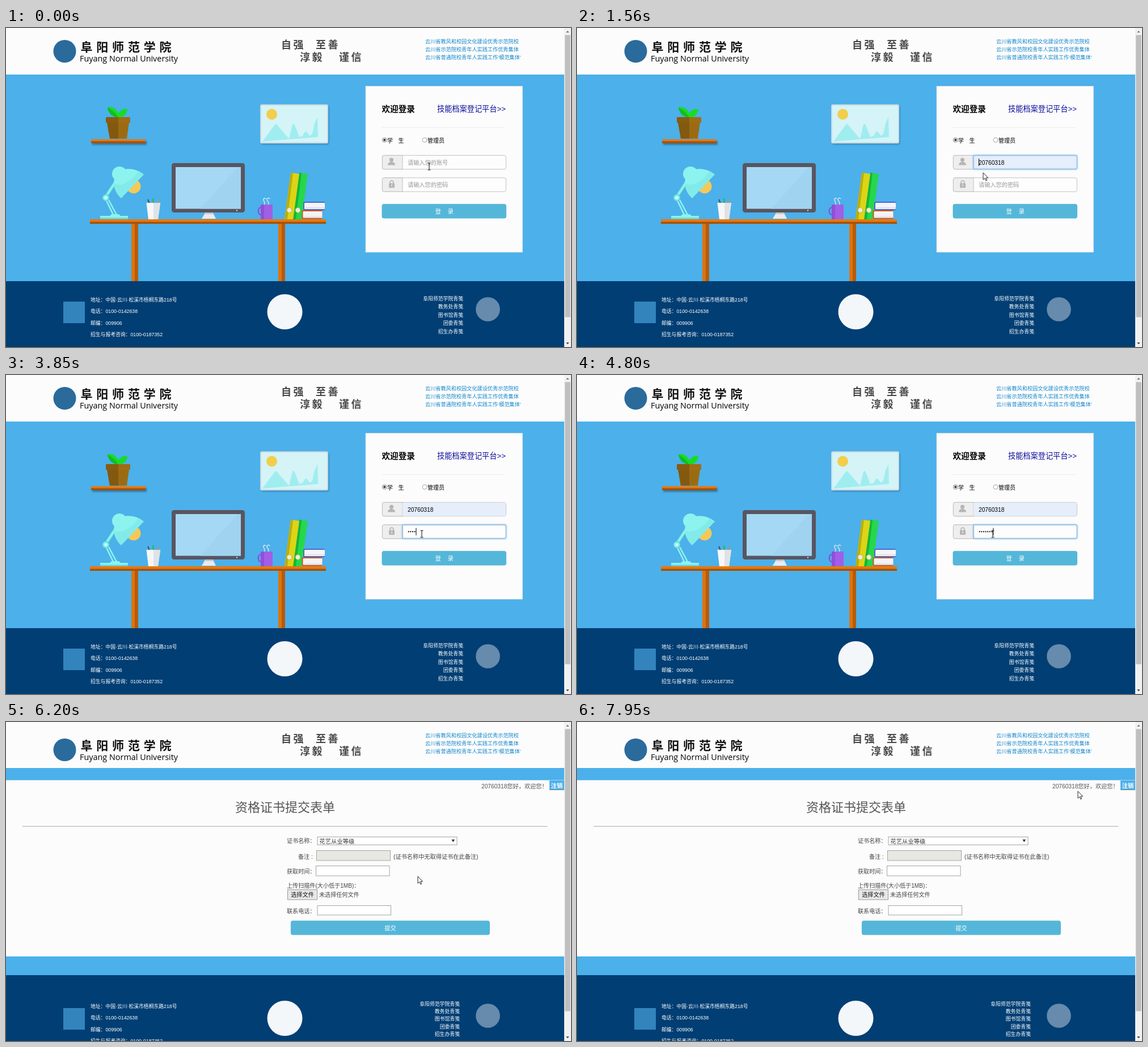
Write an HTML page that moves like this. It is 996 px wide and 562 px high and loops after 8000 ms.

```html
<!DOCTYPE html>
<html lang="zh-CN">
<head>
<meta charset="utf-8">
<title>登录</title>
<style>
html, body { margin: 0; width: 100%; height: 100%; overflow: hidden; background: #fcfcfc; }
svg { display: block; width: 100vw; height: 100vh; }
text { font-family: "Liberation Sans", "Noto Sans CJK SC", "Noto Sans CJK", sans-serif; white-space: pre; }
</style>
</head>
<body>
<svg id="stage" viewBox="0 0 996 562"></svg>
<script>
const LOOP = 8000;
const ACCOUNT = "20760318";
const SKY = "#4cb0ea", NAVY = "#003e74", PAPER = "#fcfcfc";

// cy is the visual middle of the line
const text = (x, cy, size, str, fill = "#000", more = "") =>
  `<text x="${x}" y="${cy + size * 0.37}" font-size="${size}" fill="${fill}" ${more}>${str}</text>`;
const rect = (x, y, w, h, fill, more = "") =>
  `<rect x="${x}" y="${y}" width="${w}" height="${h}" fill="${fill}" ${more}/>`;
const circle = (x, y, r, fill, more = "") =>
  `<circle cx="${x}" cy="${y}" r="${r}" fill="${fill}" ${more}/>`;
const path = (d, fill, more = "") => `<path d="${d}" fill="${fill}" ${more}/>`;
const line = (d, stroke, width, more = "") =>
  path(d, "none", `stroke="${stroke}" stroke-width="${width}" ${more}`);

const END = 'text-anchor="end"', MID = 'text-anchor="middle"', BOLD = 'font-weight="700"';

function header(dy) {
  const motto = (x, cy, s) =>
    text(x, cy, 18, s, "#484848", 'font-weight="700" letter-spacing="3.6"');
  const awards = ["云川省教风和校园文化建设优秀示范院校", "云川省示范院校青年人实践工作优秀集体",
    "云川省普通院校青年人实践工作‘模范集体’"];
  return circle(103.5, 41 + dy, 20, "#2a6b9c") +
    text(131.5, 33 + dy, 21, "阜阳师范学院", "#111", 'font-weight="700" letter-spacing="6.8"') +
    `<text x="130" y="${59 + dy}" font-size="14.4" style="font-family:'Open Sans',sans-serif">Fuyang Normal University</text>` +
    motto(485, 29, "自强") + motto(546, 29, "至善") +
    motto(518, 51.5, "淳毅") + motto(587, 51.5, "谨信") +
    awards.map((s, i) => text(739, 24 + i * 13.6, 9.17, s, "#1488cc", 'font-weight="500"')).join("");
}

function footer(dy, right, top, step, iconY) {
  const contact = ["地址：中国·云川·松溪市梧桐东路218号", "电话：0100-0142638",
    "邮编：009906", "招生与报考咨询：0100-0187352"];
  const links = ["阜阳师范学院", "教务处", "图书馆", "团委", "招生办"];
  return rect(0, 446, 984, 116, NAVY) +
    rect(101, 482 + dy, 38, 38, "#3384bd") +
    contact.map((s, i) => text(149, 478.3 + dy + i * 20.5, 8.8, s, "#fff")).join("") +
    circle(491.5, 500 + dy, 31, "#f4f7f9") +
    links.map((s, i) => text(right, top + i * step, 8.85, s + "青笺", "#fff", END)).join("") +
    circle(849.5, iconY, 21.3, "#668bad");
}

function desk() {
  const leg = x => rect(x, 345, 6, 101, "#dd730e") + rect(x + 6, 345, 6, 101, "#b65b0b");
  return rect(148, 337, 416, 5, "#e8780f") + rect(148, 341.5, 416, 3.5, "#a4520c") + leg(221) + leg(480);
}

function shelf() {
  return rect(152, 199, 96, 7, "#22566f", 'filter="url(#soft)" opacity=".6"') +
    rect(150, 196, 96, 4, "#e8780f") + rect(150, 199.5, 96, 3.5, "#a4520c") +
    path("M197 158C188 157 180 149 179 140C188 137 195 143 198 150C202 145 207 141 214 143C214 152 206 158 197 158Z", "#17dc27") +
    path("M197 158C194 149 187 145 179 140C180 149 186 156 197 158Z", "#10bd22") +
    path("M178 166H217L213 195H183Z", "#9b6b14") + path("M178 166H198V195H183Z", "#83590f") +
    rect(176, 157, 43, 10, "#a06c14", 'rx="1.5"') + rect(176, 157, 22, 10, "#875c10", 'rx="1.5"');
}

function picture() {
  return rect(450, 137, 119, 68, "#1e5f85", 'rx="3" filter="url(#soft)" opacity=".6"') +
    rect(449, 135.5, 118, 67, "#d4f4f7", 'rx="2" stroke="#cbd9e0" stroke-width="2"') +
    circle(468.5, 152, 9.5, "#f3ce4b") +
    path("M452 200L474 170Q476 168 478 171L491 186L499 195L505 170Q507 167 509 171L517 192L523 190L527 183Q529 181 531 184L536 190L540 186L544 168L549 157L550 192Z", "#a0edf0");
}

function lamp() {
  const c = "#8df3ef", d = "#5fd2d8";
  return circle(225, 279, 12.5, "#f5c957") +
    line("M175 300L190 331M181 303L196 331", c, 2.6) +
    line("M176 297L196 267", d, 6) + line("M176 297L195 268", c, 3.4) +
    circle(176, 299, 5.5, c, `stroke="${d}" stroke-width="1.5"`) + circle(176, 299, 2, "#fff") +
    circle(200, 257, 13, c) +
    path("M203 300C188 287 187 266 196 256C208 244 230 247 243 258Z", c) +
    path("M203 300C195 293 191 284 191 274C205 281 226 266 233 252L243 258Z", d, 'opacity=".25"') +
    path("M183 332Q184 328 188 328H197Q201 328 202 332Z", c) +
    rect(166, 331, 49, 5.5, c) + rect(166, 334.5, 49, 2, d);
}

function monitor() {
  return path("M352 324H364L370 336H345Z", "#e9ebf1") + path("M352 324H364L366 328H351Z", "#c4c8d1") +
    rect(292, 238, 129, 87, "#595560", 'rx="4.5"') +
    rect(299, 245, 115, 73.5, "#a5d8f4") + path("M409 245H414V318.5H342Z", "#9fd3f0") +
    circle(407, 321.5, 1.1, "#fff");
}

function cups() {
  return line("M253 309L250 302", "#3d5368", 2) + line("M259.5 309V300", "#20b84b", 2) +
    line("M266 309L270 304", "#e58a30", 2) +
    path("M247.5 308H272L268 337H251Z", "#f7f7f7") + path("M260 308H272L268 337H260Z", "#dfe3e6") +
    line("M450 316C443 316 443 329 450 329", "#8c4fd8", 2.4) +
    rect(449, 311, 21, 26, "#a05fe6", 'rx="1.5"') + rect(449, 311, 6, 26, "#8f50d9", 'rx="1.5"') +
    line("M455 311C459 308 452 304 454 301Q456 299 458 301M462 311C466 307 458 304 460 301Q463 298 465 301", "#d8e8f2", 1.4);
}

function books() {
  const tilted = (x, main, dark) =>
    path(`M${x + 11} 255L${x + 26} 257L${x + 15} 337H${x}Z`, main) +
    path(`M${x + 11} 255L${x + 15} 255.5L${x + 5} 337H${x}Z`, dark) +
    circle(x + 8.5, 321, 4.4, "#f1eecb", 'stroke="#a7a77a" stroke-width=".8"');
  const flat = (x, y, w, h, color) =>
    rect(x, y, w, h, color, 'rx="2"') + rect(x + 2, y + 2, w - 2, h - 4, "#f4f4f8", 'rx="1"') +
    line(`M${x + 4} ${y + h - 4.5}H${x + w}`, "#d6d8e0", 1);
  return tilted(506, "#25d84b", "#15b636") + tilted(491, "#ded416", "#b9ae0e") +
    flat(524, 306, 38, 15, "#4b69cf") + flat(521.5, 321, 36, 15.5, "#d0561a");
}

const focusRing = (id, y) =>
  `<g id="${id}">` + rect(698.5, y, 183.5, 25, "none", 'rx="3" stroke="#66afe9" stroke-width="3" opacity=".3" filter="url(#glow)"') +
  rect(698.7, y + .2, 182.8, 24.4, "none", 'rx="2.5" stroke="#74b2e4" stroke-width=".9"') + "</g>";

function field(y, icon, hint, ids) {
  return rect(663.4, y + .4, 218, 24.4, "#fdfdfd", 'rx="3" stroke="#bcbcbc" stroke-width=".9"') +
    path(`M699 ${y + .4}H666.4Q663.4 ${y + .4} 663.4 ${y + 3.4}V${y + 21.8}Q663.4 ${y + 24.8} 666.4 ${y + 24.8}H699Z`,
      "#eee", 'stroke="#bcbcbc" stroke-width=".9"') + icon + ids.fill +
    text(708, y + 12.8, 10.2, hint, "#989898", `id="${ids.hint}"`) + focusRing(ids.ring, y);
}

function panel() {
  const radio = (x, stroke) => circle(x, 197.3, 4, "#fff", `stroke="${stroke}" stroke-width=".9"`);
  const user = circle(679.5, 232.3, 3.6, "#b5b5b5") + path("M673 241.5C673 237 677 236 679.5 236S686 237 686 241.5Z", "#b5b5b5");
  const lock = line("M677 274V272Q677 269 680 269T683 272V274", "#b5b5b5", 1.6) +
    rect(675, 273.5, 10, 8, "#b5b5b5", 'rx="1"') + rect(679.3, 275.5, 1.4, 3.5, "#eee");
  return rect(634, 102.5, 276.5, 292.5, PAPER, 'stroke="#d3dde3" stroke-width=".8"') +
    text(662.5, 142.3, 14.6, "欢迎登录", "#000", BOLD) +
    text(760, 142, 13.2, "技能档案登记平台&gt;&gt;", "#0a0a9c") +
    line("M663 175.3H880", "#ececec", 1) +
    radio(667.3, "#777") + circle(667.3, 197.3, 2.2, "#444") + radio(738, "#999") +
    text(672, 198.3, 10, "学") + text(691.5, 198.3, 10, "生") + text(743, 198.3, 10, "管理员") +
    field(224, user, "请输入您的账号", {
      hint: "userHint", ring: "userRing",
      fill: `<g id="userValue">` + rect(699.3, 224.8, 181.7, 23.6, "#e6eefb", 'rx="2"') + text(708, 237, 10.2, ACCOUNT) + "</g>"
    }) +
    field(263.5, lock, "请输入您的密码", { hint: "passHint", ring: "passRing", fill: '<g id="dots"></g>' }) +
    rect(663, 310.4, 218.5, 24.6, "#54b7d9", 'rx="3" stroke="#43add0" stroke-width=".8"') +
    text(756.5, 323, 10.4, "登", "#fff") + text(778.5, 323, 10.4, "录", "#fff") +
    rect(0, 0, 1, 13, "#000", 'id="caret"');
}

function formPage() {
  const box = (x, y, w, h, fill = "#fff") => rect(x + .5, y + .5, w - 1, h - 1, fill, 'stroke="#a4a4a4"');
  const label = (x, cy, s) => text(x, cy, 10.1, s, "#444");
  return rect(0, 0, 984, 446, PAPER) + header(8) +
    rect(0, 81, 984, 21.5, SKY) + rect(0, 413, 984, 33, SKY) +
    text(838, 113, 10.2, ACCOUNT + "您好，欢迎您！", "#555") +
    rect(958, 103, 26, 17, SKY) + line("M958 119.5H984", "#6f8796", 1) +
    text(971, 112, 10.4, "注销", "#fff", MID + " " + BOLD) +
    text(404, 150.3, 22, "资格证书提交表单", "#555") +
    line("M29 183.7H954.5", "#c4c4c4", 1.6) +
    label(495, 209.5, "证书名称：") + box(548.5, 202, 247, 15) +
    text(552.5, 210.5, 10.3, "花艺从业等级", "#333") + path("M785.5 207H791L788.2 211.8Z", "#333") +
    label(515, 236.8, "备注 :") + box(547, 226, 131, 18.5, "#e8e8e3") +
    text(683, 236.8, 10.2, "(证书名称中无取得证书在此备注)", "#444") +
    label(495, 263.5, "获取时间：") + box(546, 253, 130.5, 18.5) +
    label(495, 287.8, "上传扫描件(大小低于1MB)：") +
    rect(496.5, 295.5, 52, 17.5, "#e8e8e8", 'stroke="#999"') +
    text(522.5, 304.5, 10.2, "选择文件", "#111", MID) + label(552, 304.5, "未选择任何文件") +
    label(495, 333, "联系电话：") + box(548.5, 323, 130.5, 17.5) +
    rect(502.4, 350.4, 350, 24.4, "#54b7d9", 'rx="3" stroke="#43add0" stroke-width=".8"') +
    text(677.5, 362.8, 10.2, "提交", "#fff", MID) +
    footer(22, 800, 497, 13.1, 517.5);
}

const scrollbar = rect(984, 0, 12, 562, "#f1f1f1") + rect(985.3, 12.5, 9.5, 497, "#bfbfbf") +
  path("M987.3 8L990 4.8L992.7 8Z", "#777") + path("M987.3 554L990 557.2L992.7 554Z", "#444");

const stage = document.getElementById("stage");
stage.innerHTML = `<defs>
  <filter id="soft" x="-20%" y="-60%" width="140%" height="240%"><feGaussianBlur stdDeviation="1.8"/></filter>
  <filter id="glow" x="-10%" y="-50%" width="120%" height="200%"><feGaussianBlur stdDeviation="1.3"/></filter>
</defs>
<g id="login">${rect(0, 0, 984, 82, PAPER)}${header(0)}${rect(0, 82, 984, 364, SKY)}
${shelf()}${picture()}${desk()}${lamp()}${monitor()}${cups()}${books()}${panel()}${footer(0, 806, 476.3, 14.6, 495.5)}</g>
<g id="form">${formPage()}</g>${scrollbar}
<g id="arrow">${path("M0 0V12.3L2.9 9.7L4.9 14L6.7 13.2L4.8 9H8.6Z", "#fff", 'stroke="#111" stroke-width=".9"')}</g>
<g id="beam">${line("M-2.6 -6H-.6L0 -5.4L.6 -6H2.6M0 -5.4V5.4M-2.6 6H-.6L0 5.4L.6 6H2.6", "#222", 1.1)}</g>`;

const el = {};
stage.querySelectorAll("[id]").forEach(n => el[n.id] = n);
const show = (n, on) => n.setAttribute("display", on ? "inline" : "none");
const clamp = v => Math.max(0, Math.min(1, v));
const ramp = (t, a, b) => clamp((t - a) / (b - a));
const within = (t, spans) => spans.some(([a, b]) => t >= a && t < b);

// time, x, y of the pointer
const route = [[0, 746, 244], [1070, 746, 244], [1350, 694, 257], [1560, 716, 255], [1840, 720, 261],
  [1980, 733, 280], [5600, 733, 280], [5601, 726, 272], [6830, 726, 272], [6900, 730, 268],
  [7250, 730, 268], [7930, 883, 122], [LOOP, 883, 122]];
const keys = [2860, 3060, 3390, 3650, 4190, 4330, 4800, 5070];
const userCaret = [[70, 540], [1070, 1630]];
const passCaret = [[2120, 2660], [2860, 5600]];

function pointer(t) {
  const i = Math.max(1, route.findIndex(k => k[0] > t));
  const [t0, x0, y0] = route[i - 1], [t1, x1, y1] = route[i];
  const u = ramp(t, t0, t1), e = u * u * (3 - 2 * u);
  return [x0 + (x1 - x0) * e, y0 + (y1 - y0) * e];
}

let drawn = -1;
function render(t) {
  const onForm = t >= 6200, filled = t >= 1280;
  const typed = keys.filter(k => t >= k).length;
  show(el.login, !onForm);
  show(el.form, onForm);
  show(el.userHint, !filled);
  show(el.userValue, filled);
  show(el.passHint, typed === 0);
  el.userRing.setAttribute("opacity", ramp(t, 70, 250) * (1 - ramp(t, 2120, 2300)));
  el.passRing.setAttribute("opacity", ramp(t, 2120, 2300));
  if (typed !== drawn) {
    el.dots.innerHTML = Array.from({ length: typed }, (_, i) => circle(709.7 + i * 3.62, 276, 1.15, "#222")).join("");
    drawn = typed;
  }
  const inPass = t >= 2120;
  show(el.caret, within(t, inPass ? passCaret : userCaret));
  el.caret.setAttribute("x", 708 + (inPass ? typed * 3.62 : 0));
  el.caret.setAttribute("y", inPass ? 269.5 : 230);

  const [x, y] = pointer(t);
  const beam = t < 1140 || (t >= 1945 && t < 5600);
  show(el.beam, beam);
  show(el.arrow, !beam);
  el[beam ? "beam" : "arrow"].setAttribute("transform", `translate(${x} ${y})`);
}

const start = performance.now();
function tick() {
  render((performance.now() - start) % LOOP);
  requestAnimationFrame(tick);
}
tick();
</script>
</body>
</html>
```
